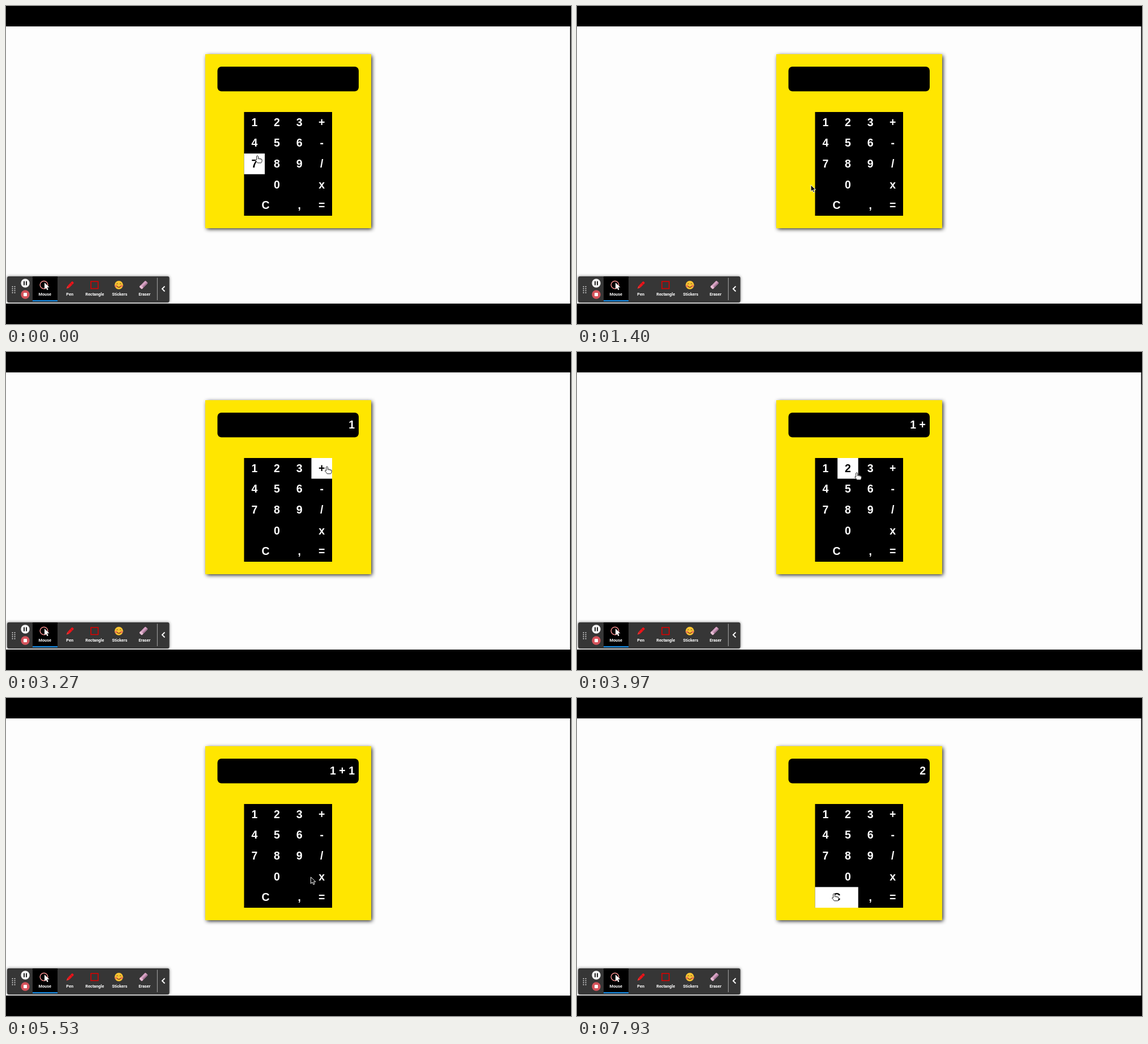
Animation, 998 px wide and 561 px high, one loop 8 s. Source, as an HTML page with a canvas:

```html
<!DOCTYPE html>
<html lang="en">
<head>
<meta charset="utf-8">
<title>Calculator</title>
<style>
html, body { margin: 0; width: 100%; height: 100%; overflow: hidden; background: #000; }
canvas { display: block; }
</style>
</head>
<body>
<canvas id="stage" width="998" height="561"></canvas>
<script>
const ctx = document.getElementById('stage').getContext('2d');
const LOOP = 8000;
const GRID = { x: 420.5, y: 187, stepX: 39.65, stepY: 36.6, size: 36.6 };
const KEY_FONT = 'bold 19.5px "Liberation Sans", Arial, sans-serif';
const LABEL_FONT = 'bold 7.3px Roboto, sans-serif';

// label, column, row, column span
const KEYS = [
  ...['123+', '456-', '789/'].flatMap((line, row) =>
    [...line].map((label, col) => ({ label, col, row, span: 1 }))),
  { label: '0', col: 0, row: 3, span: 3 },
  { label: 'x', col: 3, row: 3, span: 1 },
  { label: 'C', col: 0, row: 4, span: 2 },
  { label: ',', col: 2, row: 4, span: 1 },
  { label: '=', col: 3, row: 4, span: 1 }
].map(k => ({
  ...k,
  x: GRID.x + k.col * GRID.stepX,
  y: GRID.y + k.row * GRID.stepY,
  w: GRID.size + (k.span - 1) * GRID.stepX
}));

// time, x, y of the pointer's hot spot
const PATH = [
  [0, 444, 264], [40, 444, 264], [440, 416, 330], [870, 416, 329],
  [1670, 412, 311], [2150, 444, 204], [2560, 444, 204], [3150, 567, 202],
  [3600, 567, 202], [3880, 508, 216], [4170, 449, 202], [5030, 449, 202],
  [5740, 562, 346], [6700, 562, 346], [7100, 597, 356], [7500, 577, 351],
  [7880, 454, 345], [LOOP, 454, 345]
];

const CLICKS = [
  { at: 2350, shows: '1' },
  { at: 3450, shows: '1 +' },
  { at: 4500, shows: '1 + 1' },
  { at: 6000, shows: '2' }
];
const RIPPLE = 400;

const ARROW = new Path2D('M0 0V11.5L2.8 9L4.6 13.2L6.6 12.3L4.8 8.3H8.5Z');
const HAND = new Path2D('M-1.5 1Q0 -1 1.4 1V5Q2.8 4 3.9 5.3Q5.3 4.5 6.2 6Q8 5.4 8.1 7.4' +
  'V9.5Q7.8 11.5 6.7 12.8H.3Q-.8 10.8 -3.4 8.3Q-3.7 6.5 -1.5 7.5Z');

const smooth = p => p * p * (3 - 2 * p);

function pointerAt(t) {
  const i = Math.max(1, PATH.findIndex(k => k[0] > t));
  const [t0, x0, y0] = PATH[i - 1];
  const [t1, x1, y1] = PATH[i];
  const p = smooth((t - t0) / (t1 - t0));
  return { x: x0 + (x1 - x0) * p, y: y0 + (y1 - y0) * p };
}

function rect(x, y, w, h, color, radius = 0) {
  ctx.fillStyle = color;
  ctx.beginPath();
  ctx.roundRect(x, y, w, h, radius);
  ctx.fill();
}

function disc(x, y, r, color) {
  ctx.fillStyle = color;
  ctx.beginPath();
  ctx.arc(x, y, r, 0, Math.PI * 2);
  ctx.fill();
}

function ring(x, y, r, width, color) {
  ctx.strokeStyle = color;
  ctx.lineWidth = width;
  ctx.beginPath();
  ctx.arc(x, y, r, 0, Math.PI * 2);
  ctx.stroke();
}

function line(points, width, color) {
  ctx.strokeStyle = color;
  ctx.lineWidth = width;
  ctx.beginPath();
  points.forEach(([x, y]) => ctx.lineTo(x, y));
  ctx.stroke();
}

function text(str, x, y, font, color, align = 'center') {
  ctx.font = font;
  ctx.fillStyle = color;
  ctx.textAlign = align;
  ctx.fillText(str, x, y);
}

// Runs draw with the origin moved to x, y and turned by angle.
function placed(x, y, angle, draw) {
  ctx.save();
  ctx.translate(x, y);
  ctx.rotate(angle);
  draw();
  ctx.restore();
}

function shadowed(color, blur, dx, dy, draw) {
  ctx.save();
  Object.assign(ctx, { shadowColor: color, shadowBlur: blur, shadowOffsetX: dx, shadowOffsetY: dy });
  draw();
  ctx.restore();
}

function drawPage() {
  rect(0, 0, 998, 561, '#000');
  rect(0, 36, 996.5, 489, '#fdfdfd');
}

function drawCalculator(display, hovered) {
  shadowed('rgba(0,0,0,.9)', 7, 1.5, 1.5, () => rect(352, 85, 293, 307, '#ffe600'));
  rect(373.5, 107, 249.5, 43.5, '#000', 7);
  text(display, 616, 135, KEY_FONT, '#fff', 'right');
  rect(420.5, 187, 155.5, 183, '#000');
  for (const key of KEYS) {
    const lit = key === hovered;
    if (lit) rect(key.x, key.y, key.w, GRID.size, '#fff');
    text(key.label, key.x + key.w / 2, key.y + 24.7, KEY_FONT, lit ? '#000' : '#fff');
  }
}

function drawRecorderButtons() {
  for (let i = 0; i < 8; i++) disc(11.5 + (i % 2) * 4, 495.2 + (i >> 1) * 3.5, 1, '#ddd');
  disc(34, 489, 7.7, '#f4f4f4');
  rect(31, 485.5, 2, 7, '#222');
  rect(35, 485.5, 2, 7, '#222');
  disc(34, 509, 7.7, '#d5535b');
  rect(31, 506, 6, 6, '#fff', 1);
}

function drawTools() {
  rect(47, 477, 44, 43.5, '#000');
  rect(47, 519, 44, 2, '#168eea');

  ring(67, 492, 6.8, 1.5, '#f08a8a');
  placed(68, 488, 0, () => {
    ctx.fillStyle = '#fff';
    ctx.fill(ARROW);
  });

  placed(113, 492.5, Math.PI / 4, () => {
    rect(-2.3, -8, 4.6, 12, '#e9151b', 1.5);
    line([[-2.3, -3.5], [2.3, -3.5]], 0.8, '#8f1014');
    ctx.fillStyle = '#f0302f';
    ctx.fill(new Path2D('M-2.3 4H2.3L0 9Z'));
  });

  ctx.strokeStyle = '#d90000';
  ctx.lineWidth = 1.6;
  ctx.strokeRect(150, 486, 12.7, 12.5);

  disc(199.3, 492.3, 7.5, '#f9c431');
  for (const side of [-1, 1]) {
    disc(199.3 + side * 5, 494, 1.9, '#ee7154');
    line([[199.3 + side * 4, 490.7], [199.3 + side * 2.8, 489.3], [199.3 + side * 1.5, 490.7]], 1, '#67401c');
  }
  ctx.strokeStyle = '#8a3b1c';
  ctx.lineWidth = 1.3;
  ctx.beginPath();
  ctx.arc(199.3, 493.3, 3, 0.2, Math.PI - 0.2);
  ctx.stroke();

  placed(243, 492, -Math.PI / 4, () => {
    rect(-7.7, -3.2, 15.4, 6.4, '#d4a0c1', 1.4);
    rect(-7.7, 0.8, 15.4, 2.4, '#a97798', 1);
    rect(-7.7, -3.2, 4, 6.4, '#e7bfd5', 1.4);
  });

  ['Mouse', 'Pen', 'Rectangle', 'Stickers', 'Eraser'].forEach((label, i) =>
    text(label, 68.7 + i * 44, 511, LABEL_FONT, '#fff'));
}

function drawToolbar() {
  shadowed('rgba(0,0,0,.55)', 5, 0, 0, () => rect(2, 477, 286.5, 46, '#363636', 3));
  drawRecorderButtons();
  drawTools();
  line([[267.3, 479.5], [267.3, 519]], 1, '#aaa');
  line([[280.4, 494.5], [275.8, 499], [280.4, 503.5]], 1.8, '#fff');
}

function drawRipple(t) {
  const click = CLICKS.find(c => t >= c.at && t < c.at + RIPPLE);
  if (!click) return;
  const p = (t - click.at) / RIPPLE;
  const { x, y } = pointerAt(click.at);
  const alpha = 0.56 * Math.min(1, (1 - p) * 5);
  ring(x + 0.7, y + 1, 25.5 * (1 - (1 - p) ** 2), 2.6, `rgba(240,10,10,${alpha})`);
}

function drawPointer({ x, y }, overKey) {
  placed(x, y, 0, () => {
    const shape = overKey ? HAND : ARROW;
    ctx.lineJoin = 'round';
    ctx.lineWidth = 1;
    ctx.fillStyle = overKey ? '#fff' : '#000';
    ctx.strokeStyle = overKey ? '#222' : '#fff';
    ctx.fill(shape);
    ctx.stroke(shape);
    if (overKey) {
      line([[1.4, 4.5], [1.4, 6.5]], 0.8, '#333');
      line([[3.9, 5.3], [3.9, 7]], 0.8, '#333');
      line([[6.2, 6], [6.2, 7.5]], 0.8, '#333');
    }
  });
}

function render(t) {
  const pos = pointerAt(t);
  const hovered = KEYS.find(k =>
    pos.x >= k.x && pos.x < k.x + k.w && pos.y >= k.y && pos.y < k.y + GRID.size);
  const display = CLICKS.reduce((shown, c) => t >= c.at ? c.shows : shown, '');
  drawPage();
  drawCalculator(display, hovered);
  drawToolbar();
  drawRipple(t);
  drawPointer(pos, hovered);
}

const start = performance.now();
function tick() {
  render((performance.now() - start) % LOOP);
  requestAnimationFrame(tick);
}
tick();
</script>
</body>
</html>
```
